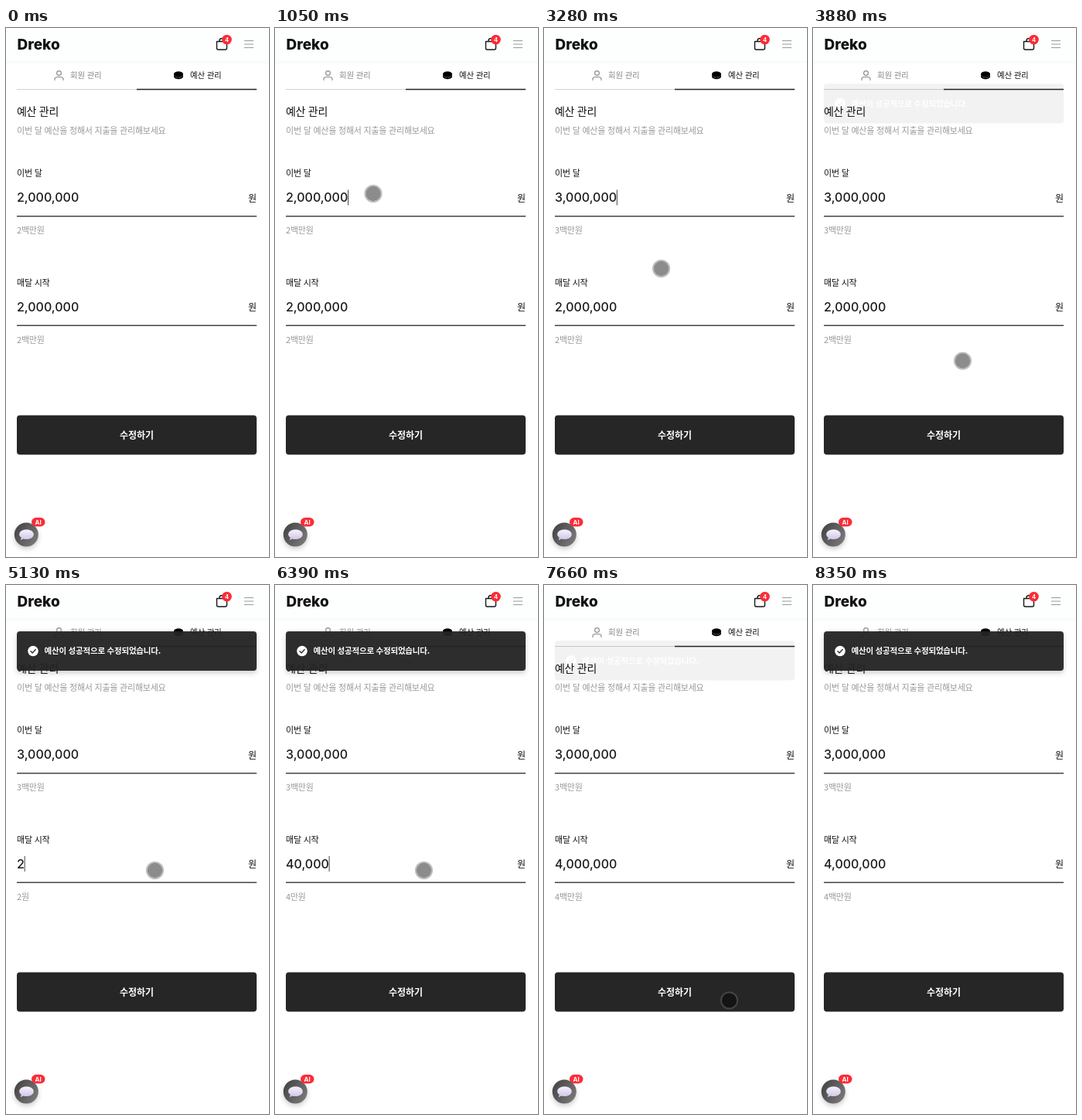
Write an HTML page that moves like this. It is 340 px wide and 685 px high and loops after 8.39 s.

```html
<!DOCTYPE html>
<html lang="ko">
<head>
<meta charset="utf-8">
<title>예산 관리</title>
<style>
  html, body { margin: 0; width: 100%; height: 100%; overflow: hidden; background: #fff; }
  svg { display: block; width: 340px; height: 685px; }
  text { font: 500 11px "Noto Sans CJK KR", "Noto Sans CJK JP", "Noto Sans CJK", sans-serif; letter-spacing: -.02em; fill: #111; }
  .latin { font-family: Inter, sans-serif; letter-spacing: 0; }
  .amount { font-size: 16px; fill: #1c1c1c; white-space: pre; }
  .hint { fill: #999; }
  .line { fill: none; stroke: #171717; stroke-width: 1.4; stroke-linecap: round; stroke-linejoin: round; }
  .white { fill: #fff; font-weight: 700; }
  .mid { text-anchor: middle; }
</style>
</head>
<body>
<svg viewBox="0 0 340 685">
  <defs>
    <linearGradient id="ball" x1="0" x2="1" y1=".2" y2=".8">
      <stop stop-color="#444"/><stop offset="1" stop-color="#7b7b7b"/>
    </linearGradient>
    <linearGradient id="bubble" x1="0" x2="0" y1="0" y2="1">
      <stop stop-color="#f6f2fc"/><stop offset="1" stop-color="#cfc3e6"/>
    </linearGradient>
    <linearGradient id="edge" x1="0" x2="0" y1="0" y2="1">
      <stop stop-color="#f5fafa"/><stop offset="1" stop-color="#fff"/>
    </linearGradient>
    <filter id="soft" x="-50%" y="-50%" width="200%" height="200%">
      <feDropShadow dx="0" dy="3" stdDeviation="3" flood-opacity=".2"/>
    </filter>
  </defs>

  <!-- header -->
  <rect width="340" height="44" fill="#fdfefe"/>
  <rect y="43" width="340" height="5" fill="url(#edge)"/>
  <text class="latin" x="14.5" y="28" style="font-size:19px;font-weight:800">Dreko</text>
  <path class="line" d="M272.5 17.5h13v8.5a2 2 0 0 1-2 2h-9a2 2 0 0 1-2-2zM276 17.500v-1a3 3 0 0 1 6 0v1"/>
  <circle cx="285.5" cy="15" r="6.3" fill="#fb2c36"/>
  <text class="latin white mid" x="285.500" y="17.700" style="font-size:7.5px">4</text>
  <path d="M308 16.500h12M308 21h12M308 25.500h12" stroke="#999"/>

  <!-- tabs -->
  <g class="line" style="stroke:#8a8a8a;stroke-width:1.100">
    <circle cx="68.500" cy="58.500" r="2.900"/>
    <path d="M63 67.500v-1a3 3 0 0 1 3-3h5a3 3 0 0 1 3 3v1"/>
  </g>
  <text x="83" y="65" style="font-size:10.5px;font-weight:400;fill:#888">회원 관리</text>
  <path d="M217 59.500a6 3.300 0 0 1 12 0v3.500a6 3.300 0 0 1-12 0z"/>
  <path d="M217.500 61a5.500 2.800 0 0 0 11 0M221 63v2.500M225 63v2.500" fill="none" stroke="#777" stroke-width=".5"/>
  <text x="238" y="65" style="font-size:10.5px">예산 관리</text>
  <path d="M14 79.500h155" stroke="#d2d2d2"/>
  <path d="M169 79.500h155" stroke="#222" stroke-width="1.600"/>

  <text x="14" y="113" style="font-size:14px">예산 관리</text>
  <text x="14" y="137" style="font-weight:400;fill:#999">이번 달 예산을 정해서 지출을 관리해보세요</text>

  <g id="fields"></g>

  <rect x="14" y="501.500" width="310" height="51" rx="4" fill="#262626"/>
  <text class="white mid" x="169" y="531.500" style="font-size:12px;letter-spacing:0">수정하기</text>

  <!-- chat button -->
  <circle cx="26.300" cy="656" r="15.500" fill="url(#ball)" filter="url(#soft)"/>
  <path d="M26.500 649.500c5.500 0 9.300 2.700 9.300 6.300s-3.800 6.300-9.300 6.300c-1.500 0-2.800-.2-4-.6l-3.700 1.700 1-3.400c-1.600-1.100-2.600-2.400-2.600-4 0-3.600 3.800-6.300 9.300-6.300z" fill="url(#bubble)"/>
  <rect x="33" y="634" width="17.500" height="11.500" rx="5.750" fill="#fb2c36"/>
  <text class="latin white mid" x="41.700" y="642.600" style="font-size:8px">AI</text>

  <g id="toast">
    <rect x="14" y="60" width="310" height="51" rx="4" fill="#262626" fill-opacity=".94" filter="url(#soft)"/>
    <circle cx="35" cy="85.500" r="6.800" fill="#fff"/>
    <path class="line" d="M32 85.700l2.200 2.200 4-4.300" style="stroke:#303030"/>
    <text class="white" x="49.500" y="89.300" style="font-size:10.5px">예산이 성공적으로 수정되었습니다.</text>
  </g>

  <g id="pointer">
    <circle r="9.700" fill="#000" fill-opacity=".45"/>
    <circle r="10.600" fill="none" stroke="#6b6b6b" stroke-opacity=".44" stroke-width="2"/>
  </g>
</svg>
<script>
const LOOP = 8390;
const $ = id => document.getElementById(id);
const clamp = v => Math.max(0, Math.min(1, v));

// Each edit: time and the new amount
const fields = [
  { label: '이번 달', y: 0, focus: [1050, 3600], edits: [
    [0, 2e6], [1320, 2e5], [1390, 2e4], [1450, 2000], [1520, 20], [1580, 0],
    [1780, 3], [1980, 30], [2120, 300], [2250, 3000], [2450, 3e4], [2580, 3e5], [3150, 3e6]] },
  { label: '매달 시작', y: 141.5, focus: [4690, 7560], edits: [
    [0, 2e6], [4930, 2e5], [5000, 2e4], [5060, 2000], [5130, 2], [5460, 0],
    [5590, 4], [5860, 40], [6060, 400], [6190, 4000], [6390, 4e4], [6520, 4e5], [6780, 4e6]] }
];

// Pointer stops: time, x, y
const stops = [
  [40, 370, 330], [330, 170, 235], [560, 127, 214.5], [3150, 127, 214.5],
  [3500, 205, 522], [3700, 205, 522], [3880, 193.5, 431], [4230, 192.5, 369.5],
  [7000, 192.5, 369.5], [7400, 239.5, 538], [7700, 239.5, 538], [7880, 400, 600]
];

// Toasts: start of entry, start of exit
const toasts = [[3870, 6850], [7650, 1e5]];

for (const f of fields) {
  $('fields').insertAdjacentHTML('beforeend', `<g transform="translate(0 ${f.y})">
    <text x="14" y="192">${f.label}</text>
    <text class="latin amount" x="14" y="225"></text>
    <path d="M0 209.5v20" stroke="#444"/>
    <text x="313" y="224.500" style="font-size:12px">원</text>
    <path d="M14 243.700h310" stroke="#444" stroke-width="1.500"/>
    <text class="hint" x="14" y="266"></text></g>`);
  const g = $('fields').lastElementChild;
  f.amount = g.querySelector('.amount');
  f.caret = g.querySelector('path');
  f.hint = g.querySelector('.hint');
}

function inWords(n) {
  for (const [unit, word] of [[1e6, '백만'], [1e4, '만'], [1000, '천'], [100, '백']])
    if (n >= unit) return n / unit + word + '원';
  return n + '원';
}

function drawField(f, t) {
  const value = f.edits.filter(e => e[0] <= t).pop()[1];
  f.amount.textContent = value ? value.toLocaleString('en-US') : '';
  f.hint.textContent = inWords(value);
  const focused = t >= f.focus[0] && t < f.focus[1];
  const width = value ? f.amount.getComputedTextLength() : 0;
  f.caret.setAttribute('transform', `translate(${14.3 + width} 0)`);
  f.caret.setAttribute('opacity', focused ? 1 : 0);
}

function pointerAt(t) {
  const i = stops.findIndex(s => s[0] > t);
  if (i < 1) return stops[i ? stops.length - 1 : 0].slice(1);
  const a = stops[i - 1], b = stops[i];
  const k = (t - a[0]) / (b[0] - a[0]), e = k * k * (3 - 2 * k);
  return [1, 2].map(j => a[j] + (b[j] - a[j]) * e);
}

function toastAt(t) {
  const now = toasts.filter(s => s[0] <= t).pop();
  if (!now) return 0;
  const k = clamp((t - now[0]) / 360);
  return k * (2 - k) * clamp(1 - (t - now[1]) / 250);
}

function draw() {
  const t = performance.now() % LOOP;
  fields.forEach(f => drawField(f, t));
  $('pointer').setAttribute('transform', `translate(${pointerAt(t)})`);
  const shown = toastAt(t);
  $('toast').setAttribute('opacity', shown);
  $('toast').setAttribute('transform', `translate(0 ${13 * (1 - shown)})`);
  requestAnimationFrame(draw);
}
draw();
</script>
</body>
</html>
```
